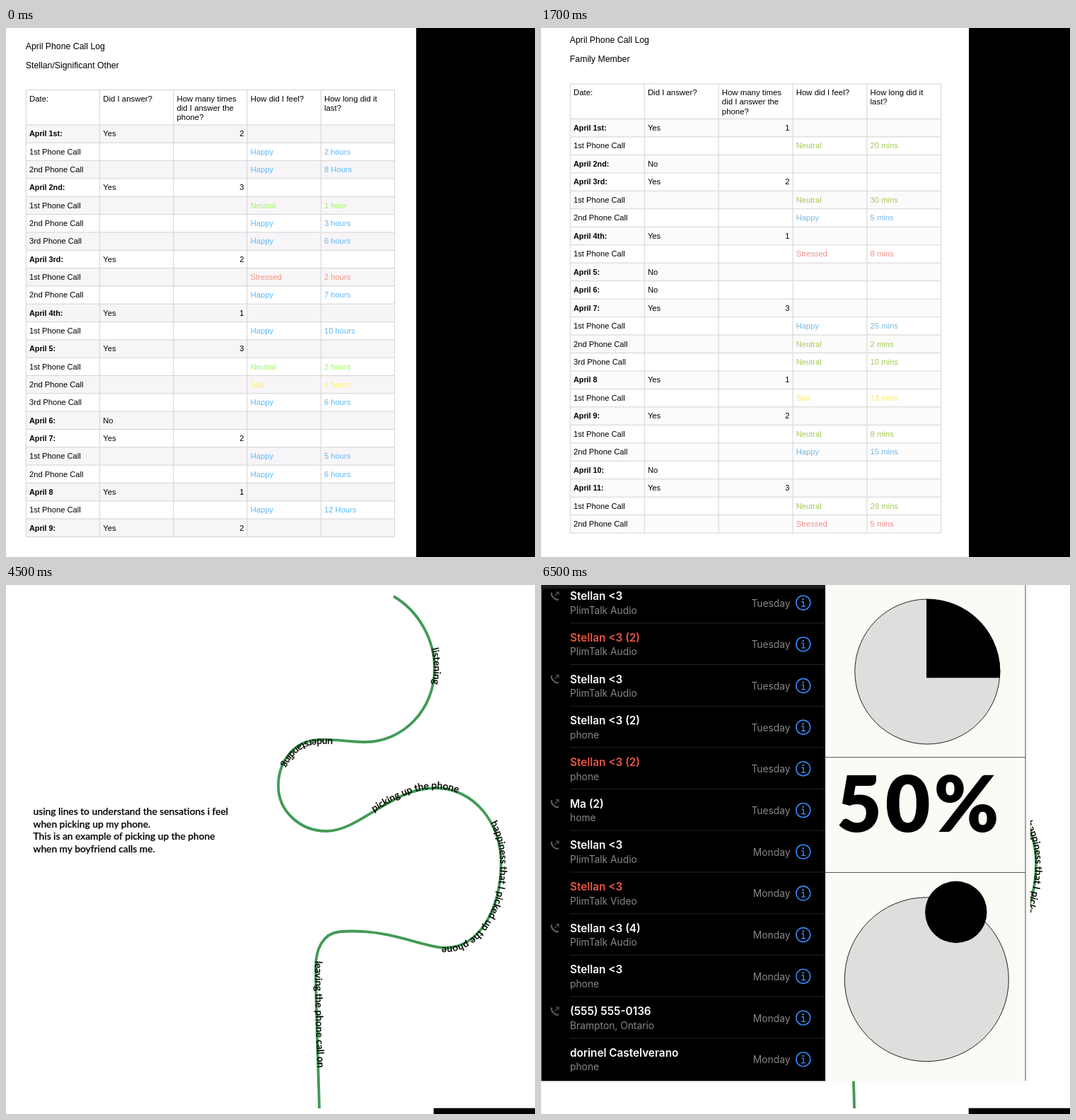
An HTML page for the animation above (8 s loop, 748 by 748 pixels).

```html
<!DOCTYPE html>
<html lang="en">
<head>
<meta charset="utf-8">
<title>Phone call log</title>
<style>
html, body { margin: 0; width: 100%; height: 100%; overflow: hidden; background: #fff; }
svg { display: block; width: 100vw; height: 100vh; }
.log { font: 11.2px "Liberation Sans", Arial, sans-serif; }
.log .title { font-size: 12.3px; }
.log .head { font-size: 11.4px; }
.log .date { font-weight: bold; font-size: 10.8px; }
.line { font: 500 13.8px Lato, sans-serif; }
.line text { stroke: #000; stroke-width: .25px; }
.calls { font: 13.8px Inter, sans-serif; fill: #87878b; }
.calls .name { font-weight: 600; font-size: 15.3px; }
.big { font: 900 110px Lato, sans-serif; letter-spacing: 5px; }
.end { text-anchor: end; }
</style>
</head>
<body>
<svg id="stage" viewBox="0 0 748 748"></svg>
<script>
const stage = document.getElementById('stage');

const text = (x, y, s, cls = '', fill = '') =>
  `<text x="${x}" y="${y}" class="${cls}"${fill && ` fill="${fill}"`}>${s.replace(/</g, '&lt;')}</text>`;
const rect = (x, y, w, h, fill) => `<rect x="${x}" y="${y}" width="${w}" height="${h}" fill="${fill}"/>`;
const circle = (x, y, r, attrs) => `<circle cx="${x}" cy="${y}" r="${r}" ${attrs}/>`;
const path = (d, attrs) => `<path d="${d}" fill="none" ${attrs}/>`;

const feelings = { H: 'Happy', N: 'Neutral', S: 'Stressed', D: 'Sad' };
const bright = { H: '#5bbafa', N: '#9bfb5c', S: '#f3937c', D: '#fff45c' };
const muted = { H: '#76b8e4', N: '#a4c957', S: '#ee8f88', D: '#f8e970' };
const headings = ['Date:', 'Did I answer?', 'How many times|did I answer the|phone?',
  'How did I feel?', 'How long did it|last?'];

// Rows: "@day count" is a date (0 = not answered), anything else a call: feeling letter + length.
function log({ who, titleY, x, y, col, head, row, page, colors, tint, rows }) {
  const items = rows.split(',');
  const top = y + head, bottom = top + row * items.length, right = x + col * 5;
  const cx = i => x + col * i + 4.7;
  let out = rect(0, 0, 748, 748, '#fff') + rect(page, 0, 748 - page, 748, '#000');
  out += text(x - .5, titleY, 'April Phone Call Log', 'title') + text(x - .5, titleY + 26.8, who, 'title');
  let grid = `M${x} ${y}H${right}`, cells = '', call = 0;
  headings.forEach((h, i) => h.split('|').forEach((s, k) =>
    cells += text(cx(i), y + 16 + k * 13.3, s, 'head')));
  items.forEach((item, i) => {
    const rowY = top + row * i, base = rowY + row / 2 + 3.8;
    if (i % 2 == 0) out += rect(x, rowY, col * 5, row, tint);
    grid += `M${x} ${rowY}H${right}`;
    if (item[0] == '@') {
      const [day, count] = item.slice(1).split(' ');
      call = 0;
      cells += text(cx(0), base, 'April ' + day, 'date');
      if (count) cells += text(cx(1), base, +count ? 'Yes' : 'No');
      if (+count) cells += text(x + col * 3 - 4.5, base, count, 'end');
    } else {
      const mood = item[0];
      cells += text(cx(0), base, ['1st', '2nd', '3rd'][call++] + ' Phone Call');
      cells += text(cx(3), base, feelings[mood], '', colors[mood]);
      cells += text(cx(4), base, item.slice(1), '', colors[mood]);
    }
  });
  grid += `M${x} ${bottom}H${right}`;
  for (let i = 0; i < 6; i++) grid += `M${x + col * i} ${y}V${bottom}`;
  return `<g class="log">${out}${path(grid, 'stroke="#d3d2d4"')}${cells}</g>`;
}

const partnerLog = log({
  who: 'Stellan/Significant Other', titleY: 30.3, x: 28.3, y: 87.6, col: 104.25, head: 49.4, row: 25.32,
  page: 580, colors: bright, tint: '#f8f5f8',
  rows: '@1st: 2,H2 hours,H8 Hours,@2nd: 3,N1 hour,H3 hours,H6 hours,@3rd: 2,S2 hours,H7 hours,' +
    '@4th: 1,H10 hours,@5: 3,N2 hours,D4 hours,H6 hours,@6: 0,@7: 2,H5 hours,H6 hours,@8 1,H12 Hours,@9: 2'
});
const familyLog = log({
  who: 'Family Member', titleY: 21.2, x: 41.3, y: 79, col: 104.9, head: 49.5, row: 25.46,
  page: 605, colors: muted, tint: '#fcfbfc',
  rows: '@1st: 1,N20 mins,@2nd: 0,@3rd: 2,N30 mins,H5 mins,@4th: 1,S8 mins,@5: 0,@6: 0,@7: 3,H25 mins,' +
    'N2 mins,N10 mins,@8 1,D13 mins,@9: 2,N8 mins,H15 mins,@10: 0,@11: 3,N28 mins,S5 mins'
});
const otherLog = log({
  who: 'Miscellaneous Calls', titleY: 24.2, x: 32.4, y: 68.2, col: 104.1, head: 49.6, row: 25.27,
  page: 605, colors: bright, tint: '#f9f6f8',
  rows: '@1st: 1,N10 mins,@2nd: 0,@3rd: 0,@4th: 2,H8 mins,N3 mins,@5: 0,@6: 0,@7: 3,H5 mins,N2 mins,' +
    'N10 mins,@8 1,N3 mins,@9:,@10: 0,@11: 1,S20 mins,@12: 1,N6 mins,@13: 0,@14: 2,N26 mins'
});

const curve = 'M548 16C584 37 606 78 606 118C606 176 562 222 507 222C482 222 462 217 440 219' +
  'C407 221 385 250 385 284C385 320 416 348 453 348C500 348 545 287 607 287C662 287 700 337 700 392' +
  'C700 460 668 513 621 513C592 513 550 489.5 490 489.5Q478 489.5 470 490.5C450 493 438 512 438 540' +
  'C438 600 442 690 443 740';
const labels = [
  [604, 89, 'listening'], [462, 220, 'understanding'], [519, 320, 'picking up the phone'],
  [687, 334, 'happiness that I picked up the phone'], [438, 531, 'leaving the phone call on']
];

// Arc length of the point on the curve nearest to (x, y).
function lengthAt(el, x, y) {
  let best = 0, min = Infinity;
  for (let s = 0; s < el.getTotalLength(); s++) {
    const p = el.getPointAtLength(s), d = Math.hypot(p.x - x, p.y - y);
    if (d < min) [min, best] = [d, s];
  }
  return best;
}

function lines() {
  const el = document.createElementNS('http://www.w3.org/2000/svg', 'path');
  el.setAttribute('d', curve);
  const note = ['using lines to understand the sensations i feel', 'when picking up my phone.',
    'This is an example of picking up the phone', 'when my boyfriend calls me.'];
  return '<g class="line">' + rect(0, 0, 748, 748, '#fff') + rect(604.7, 739.7, 144, 9, '#000') +
    path(curve, 'id="curve" stroke="#429a55" stroke-width="3.8"') +
    note.map((s, i) => text(38.5, 325.3 + i * 17.4, s)).join('') +
    labels.map(([x, y, s]) => `<text dy="1"><textPath href="#curve" startOffset="${lengthAt(el, x, y)}">${s}</textPath></text>`).join('') +
    '</g>';
}

// Leading ">" marks an outgoing call, "!" a missed one.
const recents = ['>Stellan <3|PlimTalk Audio', '!Stellan <3 (2)|PlimTalk Audio', '>Stellan <3|PlimTalk Audio',
  'Stellan <3 (2)|phone', '!Stellan <3 (2)|phone', '>Ma (2)|home', '>Stellan <3|PlimTalk Audio',
  '!Stellan <3|PlimTalk Video', '>Stellan <3 (4)|PlimTalk Audio', 'Stellan <3|phone',
  '>(555) 555-0136|Brampton, Ontario', 'dorinel Castelverano|phone'];

function recentCall(entry, i) {
  const [name, kind] = entry.replace(/^[>!]/, '').split('|');
  return `<g transform="translate(0 ${i * 58.7})">` +
    text(41, 21.2, name, 'name', entry[0] == '!' ? '#ea5545' : '#fff') + text(41, 40.8, kind) +
    text(352.5, 30.5, i < 6 ? 'Tuesday' : 'Monday', 'end') +
    circle(370.8, 25, 10, 'fill="none" stroke="#3587f5" stroke-width="1.6"') +
    circle(370.6, 20.3, 1.3, 'fill="#3587f5"') +
    path('M368.3 23.7H371.2V30M368 30.2H374', 'stroke="#3587f5" stroke-width="1.4"') +
    (entry[0] == '>' ? path('M15 11.5Q14 14 17.5 17.8T24 20.5', 'stroke="#58585b" stroke-width="2.4" stroke-linecap="round"') +
      path('M19.5 15.5L25 10M20.8 10H25V14.2', 'stroke="#58585b" stroke-width="1.2"') : '') +
    (i < 11 ? path('M41 53.8H402', 'stroke="#232325"') : '') + '</g>';
}

const outline = 'fill="#dfdedd" stroke="#222" stroke-width="1"';
const board = rect(0, 0, 692, 701.5, '#fcfaf5') + rect(.5, 0, 401.5, 701.3, '#000') + rect(.5, 0, 401.5, 5, '#1b1b1c') +
  `<g class="calls">${recents.map(recentCall).join('')}</g>` +
  path('M402 243.7H685M402 406.5H685M685 0V701', 'stroke="#555"') +
  circle(546.3, 122.5, 102.5, outline) +
  '<path d="M545 20A102.8 102.8 0 0 1 649 131.3H545Z"/>' +
  text(418, 349, '50%', 'big') +
  circle(545.3, 557.7, 116, outline) + circle(586.8, 462.5, 43.7, '');

const scenes = [[0, partnerLog], [500, familyLog], [2500, otherLog], [4500, lines()], [6500, board]];
stage.innerHTML = scenes.map(([, s]) => `<g>${s}</g>`).join('');
const layers = [...stage.children];

// Each scene covers the ones before it.
function frame() {
  const t = performance.now() % 8000;
  layers.forEach((g, i) => g.style.display = t >= scenes[i][0] ? '' : 'none');
  requestAnimationFrame(frame);
}
frame();
</script>
</body>
</html>
```
